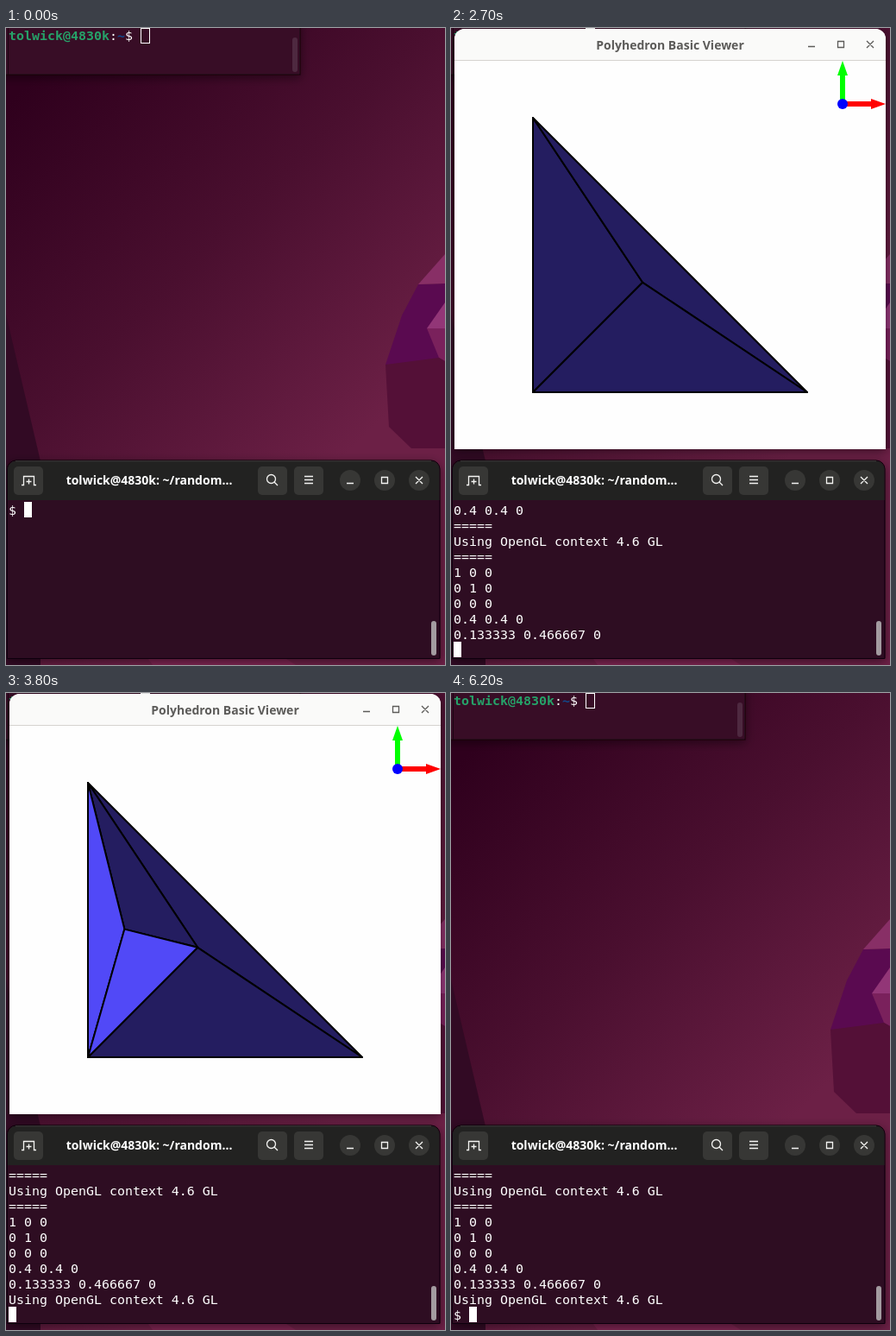
Animation, 509 px wide and 738 px high, one loop 6300 ms. Source, as an HTML page:

```html
<!DOCTYPE html>
<html lang="en">
<head>
<meta charset="utf-8">
<title>Polyhedron viewer demo</title>
<style>
html, body { margin: 0; width: 100%; height: 100%; overflow: hidden; background: #2c0419; }
svg { display: block; }
.mono { font: 14.95px "DejaVu Sans Mono", monospace; fill: #fff; white-space: pre; }
.bold { font-weight: bold; }
.title { font: bold 14px "Open Sans", "Noto Sans", sans-serif; text-anchor: middle; }
.icon { fill: none; stroke-width: 1.3; }
</style>
</head>
<body>
<svg width="509" height="738" viewBox="0 0 509 738">
  <defs>
    <linearGradient id="sky" gradientUnits="userSpaceOnUse" x1="45" y1="45" x2="440" y2="450">
      <stop offset="0" stop-color="#2f001d"/>
      <stop offset=".5" stop-color="#4a0f2f"/>
      <stop offset="1" stop-color="#6c2046"/>
    </linearGradient>
    <filter id="shadow" x="-20%" y="-20%" width="140%" height="140%">
      <feDropShadow dx="0" dy="3" stdDeviation="6" flood-color="#000" flood-opacity=".45"/>
    </filter>
  </defs>

  <g id="wallpaper">
    <rect width="509" height="738" fill="url(#sky)"/>
    <path d="M0 332L40 502V738H0Z" fill="#320a24"/>
    <path d="M165 731H325L336 738H170Z" fill="#7c2450"/>
    <path d="M478 297L509 296V388L440 390L459 333Z" fill="#5a0a50"/>
    <path d="M509 262L478 297L509 296Z" fill="#882f66"/>
    <path d="M509 318L488 348H509Z" fill="#923677"/>
    <path d="M488 348H509V386L502 382Z" fill="#7a215c"/>
    <path d="M440 390L502 382L509 386V487H470L444 462Z" fill="#541037"/>
  </g>

  <g id="back-terminal">
    <rect x="-10" y="-10" width="351" height="64" fill="#390c28" stroke="#14020d" filter="url(#shadow)"/>
    <path d="M2.5 0V54" stroke="#1c0513"/>
    <rect x="332" y="11" width="6" height="40" rx="3" fill="#4e2940"/>
    <text class="mono" x="3" y="14"><tspan class="bold" fill="#26a269">tolwick@4830k</tspan>:<tspan class="bold" fill="#12488b">~</tspan>$</text>
    <rect x="156.5" y=".5" width="10" height="17" fill="none" stroke="#fff"/>
  </g>

  <g id="viewer">
    <path d="M4 488V13A12 12 0 0 1 16 1H492A12 12 0 0 1 504 13V488Z" fill="#fefefe" filter="url(#shadow)"/>
    <path d="M4 37.5V13A12 12 0 0 1 16 1H492A12 12 0 0 1 504 13V37.5Z" fill="#fafaf9"/>
    <path d="M4 37.5H504" stroke="#d5d3d0"/>
    <text class="title" x="254" y="25" fill="#5c5b59">Polyhedron Basic Viewer</text>
    <path class="icon" stroke="#5c5b59" d="M414 21.5H422M448.5 15.5H455.5V22.5H448.5ZM482 15L490 23M490 15L482 23"/>
    <g id="mesh" stroke="#000" stroke-width="2" stroke-linejoin="round"></g>
    <path d="M454 88V52" stroke="#0f0" stroke-width="6"/>
    <path d="M448 55L454 38L460 55Z" fill="#0f0"/>
    <path d="M454 88H490" stroke="#f00" stroke-width="6"/>
    <path d="M487 82L504 88L487 94Z" fill="#f00"/>
    <circle cx="454" cy="88" r="6" fill="#00f"/>
  </g>

  <g id="terminal">
    <path d="M1.5 730.5V511A10 10 0 0 1 11.5 501H493A10 10 0 0 1 503 511V730.5Z" fill="#2e0b22" stroke="#0d0309" filter="url(#shadow)"/>
    <path d="M2 547V511A10 10 0 0 1 12 501.5H492.5A10 10 0 0 1 502.5 511V547Z" fill="#222221"/>
    <path d="M11 501.8H493" stroke="#3b3b39"/>
    <g fill="#373735">
      <rect x="9" y="508" width="34" height="33" rx="5"/>
      <rect x="292" y="508" width="34" height="33" rx="5"/>
      <rect x="334" y="508" width="34" height="33" rx="5"/>
      <circle cx="399" cy="524" r="12"/>
      <circle cx="439" cy="524" r="12"/>
      <circle cx="479" cy="524" r="12"/>
    </g>
    <g class="icon" stroke="#f4f4f2">
      <path d="M18 529.5H20.5V519.5H32.5V529.5H35M23.5 525.5H29.5M26.5 522.5V528.5"/>
      <circle cx="307.5" cy="522.5" r="5"/>
      <path d="M311 526L315 530M346 519.5H356M346 523.5H356M346 527.5H356"/>
      <path d="M395 527.5H403M435.5 520.5H442.5V527.5H435.5ZM475 520L483 528M483 520L475 528"/>
    </g>
    <text class="title" x="166" y="529" fill="#fff">tolwick@4830k: ~/random…</text>
    <g id="screen"></g>
    <rect id="cursor" width="9" height="18" fill="#fff"/>
    <rect x="493" y="687" width="6" height="40" rx="3" fill="#a39ba0"/>
  </g>
</svg>
<script>
const LOOP = 6300, TICK = 100, ROWS = 10;
const $ = id => document.getElementById(id);

function add(parent, tag, attrs, text = "") {
  const node = document.createElementNS("http://www.w3.org/2000/svg", tag);
  for (const key in attrs) node.setAttribute(key, attrs[key]);
  node.textContent = text;
  parent.append(node);
}

// Terminal contents: each step keeps everything printed so far.
const configure = ["$ ./build+run ", "-- Configuring done", "-- Generating done",
  "-- Build files have been written to: /home/tolwick/ran", "dom/demo/build"];
const points = ["1 0 0", "0 1 0", "0 0 0", "0.4 0.4 0"];
const context = "Using OpenGL context 4.6 GL";
const built = [...configure, "*Consolidate compiler generated dependencies of target", "*demo",
  "[100%] Built target demo", ...points, "====="];
const firstView = [...built, context];
const secondRun = [...firstView, "=====", ...points, "0.133333 0.466667 0"];
const secondView = [...secondRun, context];

const screens = [
  [0, ["$ "]],
  [600, ["$ ./b"]],
  [700, ["$ ./build+run "]],
  [1400, [...configure, ""]],
  [1500, [...built, ""]],
  [1700, [...firstView, ""]],
  [2700, [...secondRun, ""]],
  [2900, [...secondView, ""]],
  [4000, [...secondView, "$ "]],
];
const blinks = [100, 600, 1200, 1400, 2000, 2600, 3200, 3800, 4400, 5000, 5500, 6200];

function drawScreen(time) {
  const lines = screens.findLast(([at]) => time >= at)[1].slice(-ROWS);
  $("screen").replaceChildren();
  lines.forEach((line, row) => {
    const accent = line.startsWith("*");
    add($("screen"), "text", {
      class: accent ? "mono bold" : "mono", x: 3, y: 564 + 18 * row,
      style: accent ? "fill:#a347ba" : ""
    }, accent ? line.slice(1) : line);
  });
  const last = lines.length - 1;
  $("cursor").setAttribute("x", 3 + 9 * lines[last].length);
  $("cursor").setAttribute("y", 549 + 18 * last);
  const toggles = blinks.filter(at => time >= at).length;
  $("cursor").setAttribute("visibility", toggles % 2 ? "hidden" : "visible");
}

const vertex = { A: [0, 1], B: [0, 0], C: [1, 0], D: [.4, .4], E: [.133333, .466667] };
const DARK = "#241d60", LIGHT = "#5149f7";
const meshes = {
  first: { ABD: DARK, ADC: DARK, BCD: DARK },
  second: { ADC: DARK, BCD: DARK, AED: DARK, ABE: LIGHT, BDE: LIGHT }
};

function drawMesh(faces) {
  $("mesh").replaceChildren();
  for (const face in faces) {
    const corners = [...face].map(v => [95 + 318 * vertex[v][0], 422 - 318 * vertex[v][1]]);
    add($("mesh"), "polygon", { points: corners.join(" "), fill: faces[face] });
  }
}

const views = [
  { open: 1700, close: 2720, end: 2900, mesh: "first" },
  { open: 2900, close: 3950, end: 4100, mesh: "second" }
];

function drawViewer(time) {
  const view = views.find(v => time >= v.open && time < v.end);
  $("viewer").setAttribute("visibility", view ? "visible" : "hidden");
  if (!view) return;
  drawMesh(meshes[view.mesh]);
  let scale = 1, opacity = 1, pivot = 244.5;
  if (time < view.open + TICK) {
    scale = .98;
    opacity = .97;
    pivot = 488;
  } else if (time > view.close) {
    const rest = Math.max(0, 1 - (time - view.close) / 150);
    const eased = 1 - rest * rest;
    scale = 1 - .2 * eased;
    opacity = 1 - eased;
  }
  $("viewer").setAttribute("opacity", opacity);
  $("viewer").setAttribute("transform",
    `translate(254 ${pivot}) scale(${scale}) translate(-254 ${-pivot})`);
}

let shown = -1;
function frame() {
  const time = Math.floor(performance.now() % LOOP / TICK) * TICK;
  if (time !== shown) {
    shown = time;
    drawScreen(time);
    drawViewer(time);
  }
  requestAnimationFrame(frame);
}
frame();
</script>
</body>
</html>
```
